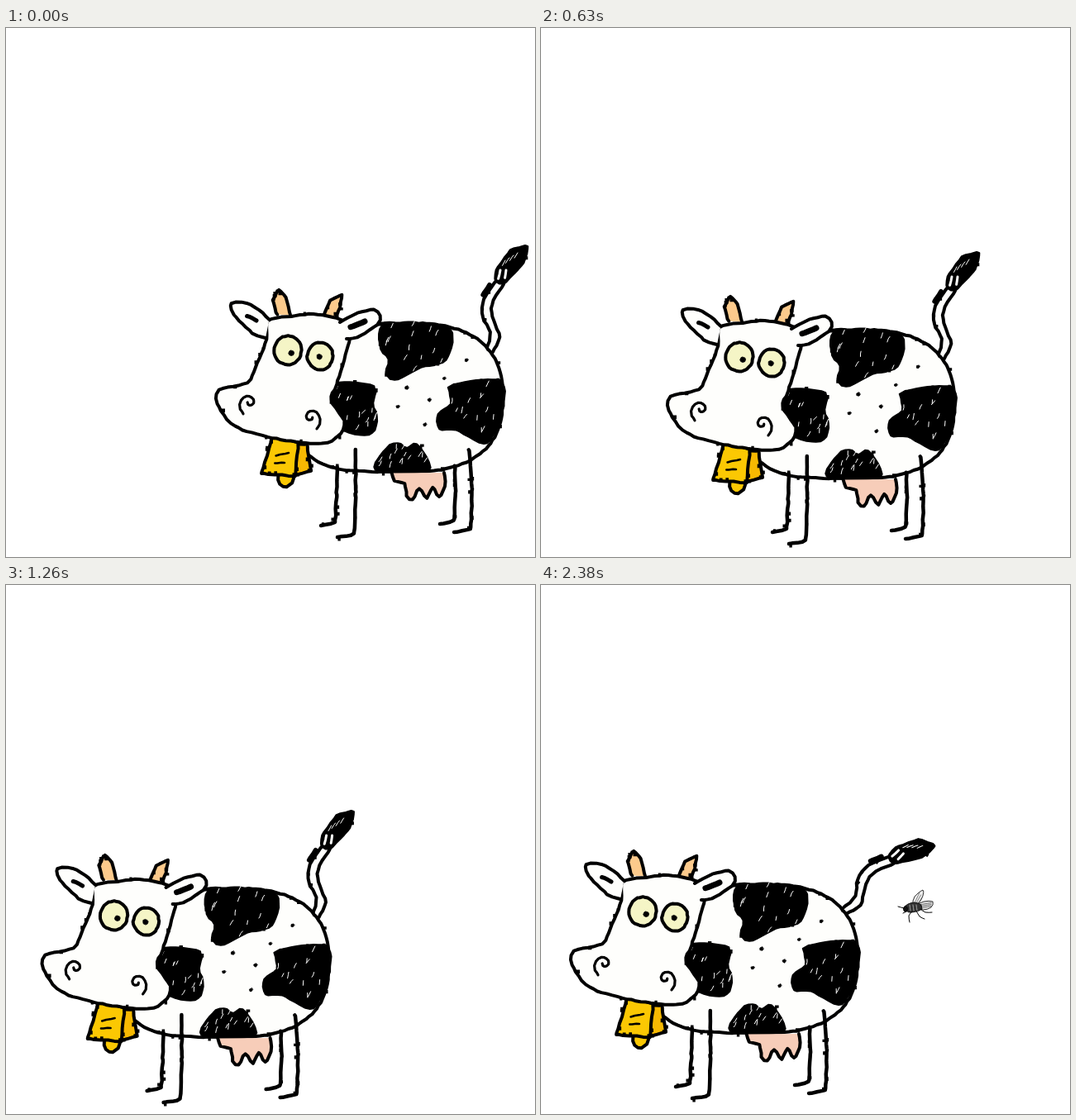
An HTML page with a canvas for the animation above (2.45 s loop, 640 by 640 pixels).

```html
<!DOCTYPE html>
<html lang="en">
<head>
<meta charset="utf-8">
<title>Cow and fly</title>
<style>
html, body { margin: 0; width: 100%; height: 100%; overflow: hidden; background: #fff; }
canvas { display: block; width: 640px; height: 640px; }
</style>
</head>
<body>
<canvas id="stage" width="640" height="640"></canvas>
<script>
const ctx = document.getElementById('stage').getContext('2d');
const { PI, abs, sin, cos, sign, floor, ceil, hypot } = Math;
const STEP = 70, COUNT = 35, SWAT = 26;
const INK = '#000', SKIN = '#fefefc', HORN = '#fcca8c', GOLD = '#fbc803', PINK = '#f7cdb9', EYE = '#f5f5c6';

let seed = 7;
const rand = () => (seed = (seed * 16807) % 2147483647) / 2147483647;
const spread = r => (rand() * 2 - 1) * r;
const series = (n, f) => Array.from({ length: n }, (_, i) => f(i));
const parse = s => s.split(' ').map(p => p.split(',').map(Number));

// Hand-drawn polyline: a cardinal spline through the points, slightly shaken.
function rough(p, closed, curve, shake) {
  const n = p.length, out = [];
  const at = i => closed ? p[(i + n) % n] : p[Math.max(0, Math.min(n - 1, i))];
  for (let i = 0; i < (closed ? n : n - 1); i++) {
    const [a, b, c, d] = [at(i - 1), at(i), at(i + 1), at(i + 2)];
    const steps = ceil(hypot(c[0] - b[0], c[1] - b[1]) / 6);
    for (let j = 0; j < steps; j++) {
      const t = j / steps, u = 1 - t;
      out.push([0, 1].map(k =>
        b[k] * u * u * (1 + 2 * t) + c[k] * t * t * (3 - 2 * t) +
        curve / 2 * ((c[k] - a[k]) * t * u * u - (d[k] - b[k]) * t * t * u) + spread(shake)));
    }
  }
  if (!closed) out.push(p[n - 1]);
  return out;
}

// One drawn part; burrs are blots of ink scattered along its outline.
function part(points, { fill, ink = INK, width = 4, closed = false, curve = 0.9, shake = 0.5, burrs = 0 } = {}) {
  const p = rough(typeof points === 'string' ? parse(points) : points, closed, curve, shake);
  const path = new Path2D(), blots = new Path2D();
  p.forEach(([x, y], i) => i ? path.lineTo(x, y) : path.moveTo(x, y));
  if (closed) path.closePath();
  for (let i = 0; i < burrs; i++) {
    const [x, y] = p[floor(rand() * p.length)];
    blots.rect(x + spread(2.5) - 2, y + spread(2.5) - 2, 3 + rand() * 2, 3 + rand() * 2);
  }
  return { path, blots, fill, ink, width };
}

const shape = (points, fill, opts) => part(points, { fill, closed: true, ...opts });
const line = (points, opts) => part(points, opts);
const ring = (x, y, rx, ry, n = 16) =>
  series(n, i => [x + rx * cos(2 * PI * i / n), y + ry * sin(2 * PI * i / n)]);

function paint(parts) {
  ctx.lineCap = ctx.lineJoin = 'round';
  for (const { path, blots, fill, ink, width } of parts) {
    if (fill) { ctx.fillStyle = fill; ctx.fill(path); }
    if (width) { ctx.lineWidth = width; ctx.strokeStyle = ink; ctx.stroke(path); }
    ctx.fillStyle = INK;
    ctx.fill(blots);
  }
}

// Black patch with a few white gaps left by the pen.
function patch(points) {
  const black = shape(points, INK, { width: 2, burrs: 4 });
  const p = parse(points), gaps = [];
  const [left, top] = [0, 1].map(k => Math.min(...p.map(q => q[k])));
  const [right, bottom] = [0, 1].map(k => Math.max(...p.map(q => q[k])));
  for (let i = 0; i < 18; i++) {
    const x = left + (right - left) * rand(), y = top + (bottom - top) * rand();
    if (ctx.isPointInPath(black.path, x, y)) {
      gaps.push(line([[x, y], [x + 2 + spread(2), y - 4 - rand() * 3]], { ink: '#fff', width: 1 }));
    }
  }
  return [black, ...gaps];
}

// Round at the rump, squarer behind the head.
const barrel = series(40, i => {
  const a = 2 * PI * i / 40, c = cos(a), s = sin(a);
  const [rx, power] = c > 0 ? [114, 2.5] : [135, 4];
  return [487 + rx * sign(c) * abs(c) ** (2 / power), 447 + 90 * sign(s) * abs(s) ** (2 / power)];
});

const body = [
  shape(barrel, SKIN, { burrs: 22 }),
  ...patch('455,360 497,359 539,366 532,402 502,411 470,426 459,417 463,401 453,388'),
  ...patch('399,430 440,431 447,441 444,454 449,470 446,486 434,493 405,486 408,474 392,452'),
  ...patch('597,426 541,431 536,440 538,455 523,467 524,485 545,487 582,502 602,458'),
  ...patch('447,535 460,508 474,502 485,508 497,503 512,535'),
  ...parse('557,402 485,435 530,424 512,450 474,458 507,480').map(([x, y]) =>
    shape(ring(x, y, 2.2, 2, 5), INK, { width: 0.8 }))
];

const leg = (x, top, lean, foot, toe) =>
  line([[x, top], [x + lean, (top + foot) / 2], [x + lean - 2, foot], [x + lean - toe, foot + 4]],
    { width: 4.5, curve: 0.15, burrs: 5 });

const legs = [
  leg(401, 531, -1, 598, 19), leg(423, 510, 0, 612, 22),
  leg(543, 530, 1, 596, 19), leg(560, 510, 4, 606, 22),
  line('467,538 470,548 482,551 485,566 492,571 500,557 509,569 516,556 524,567 531,554 530,538', { fill: PINK })
];

const bell = [
  shape('352,504 364,503 369,536 349,541', '#f7b902', { curve: 0, burrs: 5 }),
  line('329,541 331,552 339,555 346,550 349,541', { fill: GOLD }),
  shape('322,495 354,501 350,542 309,539', GOLD, { curve: 0, burrs: 9 }),
  ...[0, 1].map(i => line([[327 - 2 * i, 517 + 10 * i], [342 - 5 * i, 514 + 12 * i]], { width: 2.6 }))
];

const eye = (x, y, r, dx) => [
  shape(ring(x, y, r, r + 1), EYE),
  shape(ring(x + dx, y + 1 - dx / -2, 3.2, 3.4, 8), INK, { width: 0.8 })
];

// Curl that opens outwards; flip mirrors it.
const nostril = (x, y, flip) => line(series(18, i => {
  const t = i / 17, a = PI * (1 - 7 / 3 * t), r = 3 + 13 * t ** 2.5;
  return [x + flip * r * cos(a), y + r * sin(a)];
}), { width: 3.2, shake: 0.3 });

const head = [
  line('328,347 323,329 330,317 339,326 344,347', { fill: HORN, curve: 0.4, burrs: 5 }),
  line('384,348 392,330 406,323 404,338 399,351', { fill: HORN, curve: 0.4, burrs: 5 }),
  shape('317,354 345,349 372,346 400,351 416,362 415,380 400,431 393,450 409,475 405,491 382,503 328,497 277,482 256,455 258,438 292,429 302,410 315,377',
    SKIN, { burrs: 12 }),
  line('318,353 306,341 291,333 273,333 276,347 298,369 314,375', { fill: SKIN }),
  line('404,356 425,345 445,341 453,348 449,359 425,374 412,376', { fill: SKIN }),
  line('292,348 303,354', { width: 5 }),
  line('417,362 434,355', { width: 7 }),
  ...eye(341, 390, 16.5, 4), ...eye(380, 397, 15.5, -1),
  nostril(295, 453, 1), nostril(368, 471, -1)
];

const PIVOT = [587, 390];
const tail = [
  shape('582,388 586,368 577,350 578,328 592,307 602,310 588,334 590,354 597,374 589,392', SKIN, { width: 0 }),
  line('582,388 586,368 577,350 578,328 592,307', { burrs: 3 }),
  line('589,392 597,374 590,354 588,334 602,310'),
  line('577,323 585,311', { width: 6 }),
  shape('593,306 593,293 610,269 631,264 626,284 603,309', INK, { width: 3, curve: 0.5, burrs: 2 }),
  ...[0, 1].map(i => line([[596 + 8 * i, 303 - i], [598 + 7 * i, 293]], { ink: SKIN, width: 3 })),
  ...series(4, i => line([[600 + 5 * i, 287 - 3 * i], [604 + 5 * i, 281 - 3 * i]], { ink: SKIN, width: 1 }))
];

const THIN = { width: 0.8, shake: 0 };
const fly = [
  shape('18,17 20,8 30,0 30,7 25,16', '#eee', THIN),
  shape('22,19 31,14 42,14 40,21 30,24', '#e2e2e2', THIN),
  ...series(3, i => line([[20 + 2 * i, 16], [26 + 1.5 * i, 3 + 3 * i]], { ...THIN, ink: '#666' })),
  ...series(3, i => line([[25, 18 + 2 * i], [40, 15.5 + 2 * i]], { ...THIN, ink: '#555' })),
  shape('7,22 12,17 20,15 28,18 29,23 22,26 13,27', '#333', THIN),
  ...series(3, i => line([[14 + 4 * i, 18], [15 + 4 * i, 25]], { ...THIN, ink: '#bbb' })),
  shape(ring(9, 23, 2.5, 3.5), '#111', THIN),
  ...['7,22 0,20', '10,26 6,28', '17,26 13,31 14,39', '22,25 26,32 32,35', '27,23 33,27 41,27']
    .map(s => line(s, { ...THIN, width: 1 }))
];

// Key poses as step, x, y.
const WALK = [[0, 0, 0], [2, -22, 16], [4, -43, 8], [6, -61, 16], [8, -79, 0], [9, -101, 8],
  [12, -140, 17], [15, -179, 11], [16, -198, 8], [21, -229, 13]];
const FLIGHT = [[19, 557, 193], [21, 521, 237], [26, 425, 342]];
const SWATS = [[12.4, 425, 342], [34.2, 432, 369], [80, 562, 249]];

function between(keys, i) {
  const k = keys.findIndex(key => key[0] >= i);
  if (k < 0) return keys[keys.length - 1].slice(1);
  if (k === 0) return keys[0].slice(1);
  const [a, b] = [keys[k - 1], keys[k]], t = (i - a[0]) / (b[0] - a[0]);
  return [1, 2].map(n => a[n] + (b[n] - a[n]) * t);
}

function pose(i) {
  if (i < SWAT) {
    return { cow: between(WALK, i), turn: 0, bug: i >= FLIGHT[0][0] && between(FLIGHT, i) };
  }
  const [turn, ...bug] = SWATS[2 - abs((i - SWAT) % 5 - 2)];
  return { cow: [-218, 5], turn, bug };
}

function draw(i) {
  const { cow, turn, bug } = pose(i);
  ctx.setTransform(1, 0, 0, 1, 0, 0);
  ctx.fillStyle = '#fff';
  ctx.fillRect(0, 0, 640, 640);
  ctx.translate(...cow);
  ctx.save();
  ctx.translate(...PIVOT);
  ctx.rotate(turn * PI / 180);
  ctx.translate(-PIVOT[0], -PIVOT[1]);
  paint(tail);
  ctx.restore();
  [body, legs, bell, head].forEach(paint);
  if (bug) {
    ctx.setTransform(1, 0, 0, 1, ...bug);
    paint(fly);
  }
}

const start = performance.now();
function tick() {
  draw(floor((performance.now() - start) / STEP) % COUNT);
  requestAnimationFrame(tick);
}
tick();
</script>
</body>
</html>
```
